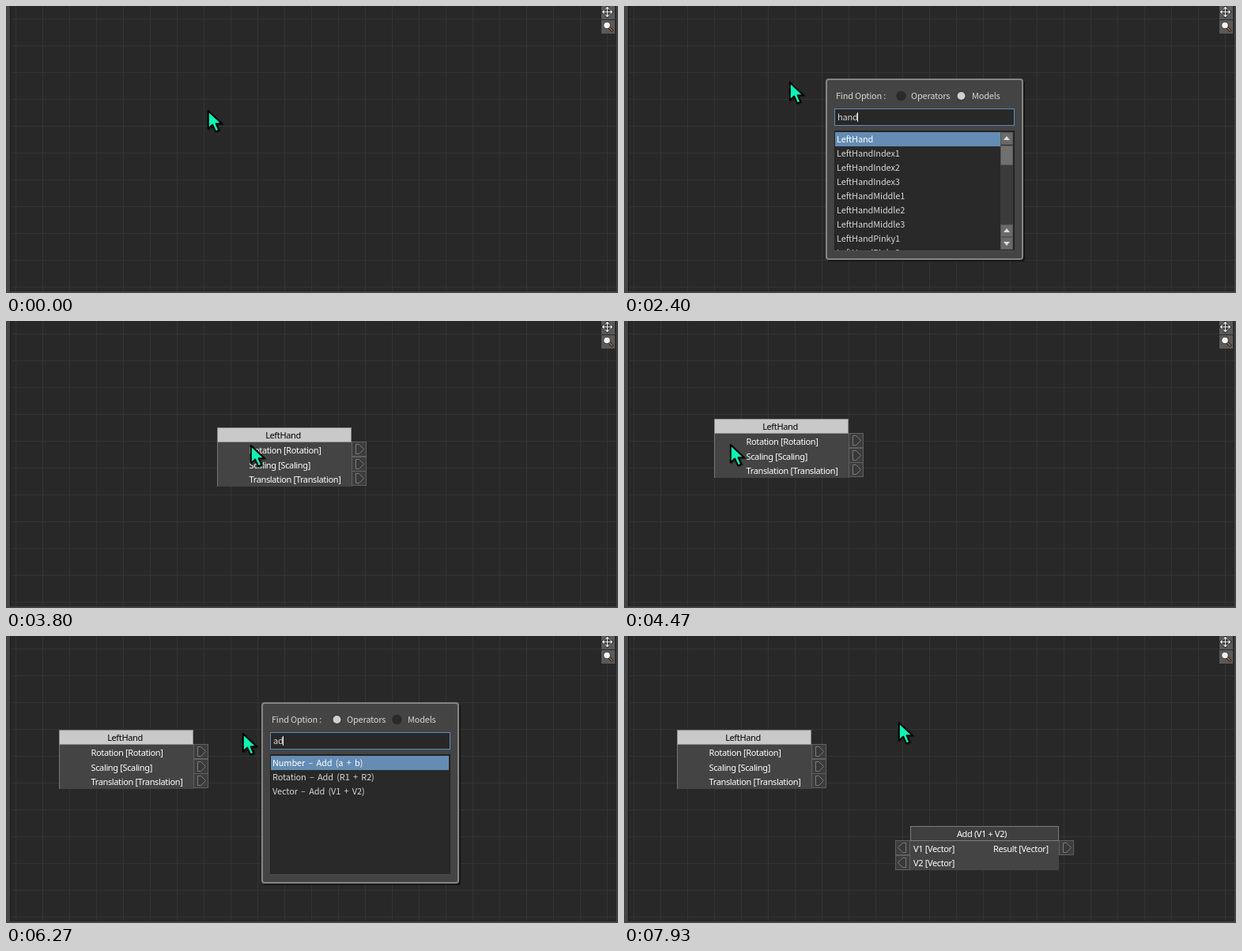
These frames come from a looping animation (774x364 px, 8 s). An HTML page:

```html
<!DOCTYPE html>
<html lang="en">
<head>
<meta charset="utf-8">
<title>Node editor</title>
<style>
  html, body { margin: 0; width: 100%; height: 100%; overflow: hidden; background: #282828; }
  svg { display: block; width: 774px; height: 364px; }
  rect, .grid { shape-rendering: crispEdges; }
  text { white-space: pre; }
  .ui { font: 11px "Noto Sans CJK JP", "Noto Sans CJK", "Liberation Sans", sans-serif; letter-spacing: -.22px; fill: #d6d6d6; }
  .list { letter-spacing: -.14px; word-spacing: 2px; }
  .node { font: 11px "Noto Sans", "Open Sans", sans-serif; letter-spacing: -.36px; fill: #fff; }
  .mid { text-anchor: middle; }
  .on { fill: #fff; }
  .dark { fill: #000; }
  .hint { fill: #858585; }
</style>
</head>
<body>
<svg id="stage" viewBox="0 0 774 364"></svg>
<script>
const LOOP = 8000, STEP = 1000 / 15;
let css = '', count = 0;

const pct = ms => (ms / LOOP * 100).toFixed(3) + '%';
const animated = (frames, body) => {
  const name = 'k' + count++;
  css += `@keyframes ${name}{${frames}}`;
  return `<g style="animation:${name} ${LOOP}ms step-end infinite">${body}</g>`;
};

// Visible only between two times
const show = (from, to, body) => animated(
  `0%{opacity:0}${pct(from)}{opacity:1}${pct(to)}{opacity:0}`, body);

// A run is a start time and legs of [steps, x, y]; each leg is even, at 15 steps a second
function move([x, y], runs, body) {
  const key = (ms, timing) =>
    `${pct(ms)}{transform:translate(${x}px,${y}px);animation-timing-function:${timing}}`;
  let frames = key(0, 'step-end');
  for (const [start, ...legs] of runs) {
    let ms = start;
    for (const [steps, toX, toY] of legs) {
      frames += key(ms, `steps(${steps},start)`);
      ms += steps * STEP;
      [x, y] = [toX, toY];
    }
    frames += key(ms, 'step-end');
  }
  return animated(frames + key(LOOP, 'step-end'), body);
}

const rect = (x, y, w, h, fill, more = '') =>
  `<rect x="${x}" y="${y}" width="${w}" height="${h}" fill="${fill}" ${more}/>`;
const frame = (x, y, w, h, fill, stroke) =>
  rect(x + .5, y + .5, w - 1, h - 1, fill, `stroke="${stroke}"`);
const circle = (x, y, r, fill) => `<circle cx="${x}" cy="${y}" r="${r}" fill="${fill}"/>`;
const text = (x, y, s, cls = 'ui') => `<text x="${x}" y="${y}" class="${cls}">${s}</text>`;
const path = (d, more) => `<path d="${d}" ${more}/>`;
const group = (x, y, body) => `<g transform="translate(${x} ${y})">${body}</g>`;

function backdrop() {
  let lines = '';
  for (let x = 12; x < 772; x += 34) lines += `M${x + .5} 0V361`;
  for (let y = 16; y < 361; y += 34) lines += `M7 ${y + .5}H772`;
  const arms = (color, width) => [0, 90, 180, 270].map(a => path('M0 0V-6M-2-4L0-6L2-4',
    `transform="rotate(${a})" stroke="${color}" stroke-width="${width}" fill="none"`)).join('');
  return path(lines, 'class="grid" stroke="#343434"')
    + rect(0, 0, 5, 364, '#444') + rect(5, 0, 1, 364, '#1c1c1c')
    + rect(772, 0, 2, 364, '#444') + rect(5, 362, 769, 2, '#444')
    + rect(753, 0, 17, 17, '#5a5a5a') + rect(753, 18, 17, 17, '#5a5a5a')
    + group(760.5, 7.5, arms('#222', 3) + arms('#eee', 1.2))
    + group(760, 24.5, path('M2 2L7.5 7.5', 'stroke="#222" stroke-width="3.4"')
      + path('M2 2L7 7', 'stroke="#a87a4c" stroke-width="1.4"')
      + circle(0, 0, 4.6, '#333') + circle(0, 0, 3.8, '#f4f4f4'));
}

const radio = (x, on) => circle(x, 22, 6.2, on ? '#363636' : '#2a2a2a')
  + (on ? circle(x, 22, 5, '#cfcfcf') : '');
const radios = models => radio(95.5, !models) + radio(171.5, models);
const caret = letters => rect(Math.round(14.8 + 6.3 * letters), 43, 1, 12, '#eee');
const placeholder = text(15, 53, 'Search', 'ui hint') + caret(0);

function scrollbar() {
  const button = (y, dir) => frame(221, y, 16, 16, '#6a6a6a', '#555')
    + group(229, y + 8, path('M-4-2H4L0 3Z', `fill="#ddd" transform="scale(1 ${dir})"`));
  return rect(221, 68, 16, 149, '#3b3b3b') + button(68, -1)
    + frame(221, 85, 16, 25, '#707070', '#585858') + button(185, -1) + button(201, 1);
}

function list(items) {
  const long = items.length > 8;
  const rows = items.slice(0, 9).map((s, i) => text(14, 81 + 18 * i, s, i ? 'ui list' : 'ui list on'));
  return rect(12, 68, long ? 209 : 225, 18, '#648cb4')
    + `<g clip-path="url(#rows)">${rows.join('')}</g>` + (long ? scrollbar() : '');
}

// Types a word letter by letter while the list narrows; the caret goes at blink
function typing(word, items, start, gap, blink, end) {
  let out = show(blink - gap, end, '');
  for (let n = 1; n <= word.length; n++) {
    const part = word.slice(0, n), from = start + (n - 1) * gap, last = n === word.length;
    const found = items.filter(s => s.toLowerCase().includes(part));
    out += show(from, last ? end : from + gap, text(15, 53, part) + list(found))
      + show(from, last ? blink : from + gap, caret(n));
  }
  return out;
}

const dialog = (x, y, body) => group(x, y,
  rect(3, 3, 249, 229, '#000', 'rx="3" opacity=".45"')
  + rect(1, 1, 248, 228, '#444', 'rx="3" stroke="#858585" stroke-width="2" style="shape-rendering:auto"')
  + text(13, 26, 'Find Option :') + text(108, 26, 'Operators') + text(185, 26, 'Models')
  + frame(11, 38, 228, 22, '#282828', '#5f8db9')
  + frame(11, 66, 228, 153, '#292929', '#202020') + rect(11, 218, 228, 1, '#4c4c4c') + body);

const fingers = ['Index', 'Middle', 'Pinky'].flatMap(f => [1, 2, 3].map(n => `LeftHand${f}${n}`));
const models = ['Head', 'Hips', 'LeftArm', 'LeftFoot', 'LeftForeArm', 'LeftHand', ...fingers];
const operators = ['Number – Absolute (|a|)', 'Number – Add (a + b)', 'Number – arccos (a)',
  'Number – arcsin (a)', 'Number – arctan (a)', 'Rotation – Add (R1 + R2)', 'Rotation – Damping',
  'Vector – Add (V1 + V2)', 'Vector – Damping'];

const modelSearch = dialog(255, 92,
  show(800, 1400, radios(false)) + show(1400, 3200, radios(true))
  + show(800, 1800, placeholder) + show(1400, 1800, list(models))
  + typing('hand', models, 1800, 190, 2670, 3200));

const operatorSearch = dialog(323, 84,
  radios(false) + show(5260, 5870, placeholder)
  + typing('add', operators, 5870, 230, 6470, 7470));

// Port cell; dir 1 points right
const port = (x, y, dir = 1) => frame(x, y, 19, 19, '#3d3d3d', '#606060')
  + group(x + 9.5, y + 9.5, path('M-4-6H0L6 0L0 6H-4Z',
    `transform="scale(${dir} 1)" fill="#383838" stroke="#7c7c7c"`));

const handNode = rect(0, 18, 171, 57, '#444') + rect(0, 18, 1, 57, '#777')
  + frame(0, 0, 170, 19, '#c9c9c9', '#8c8c8c') + text(83.5, 14, 'LeftHand', 'node mid dark')
  + ['Rotation', 'Scaling', 'Translation'].map((s, i) => {
    const y = Math.round(18.6 * i);
    return text(40.5, 33 + y, `${s} [${s}]`, 'node') + port(170, 18 + y);
  }).join('');

const addNode = rect(0, 18, 188, 38, '#444') + frame(0, 0, 188, 19, '#3f3f3f', '#7c7c7c')
  + text(90.5, 14, 'Add (V1 + V2)', 'node mid')
  + text(4, 33, 'V1 [Vector]', 'node') + text(4, 51, 'V2 [Vector]', 'node')
  + text(105, 33, 'Result [Vector]', 'node')
  + port(-19, 18, -1) + port(-19, 37, -1) + port(188, 18);

const arrow = 'M1 1.6V24L6.4 19.2L10.3 28L14.5 26.2L10.8 17.8H18.2Z';
const pointer = group(-.2, -.6,
  path(arrow, 'transform="translate(1.5 1)" stroke="#000" stroke-width="2" opacity=".35"')
  + path(arrow, 'fill="#0df5b5" stroke="#000" stroke-width="2" stroke-linejoin="round"'));

// The pointer holds the node 20 right and 32 down of its corner
const drag = [[5, 114, 124], [2, 67, 119]];
const held = drag.map(([steps, x, y]) => [steps, x + 20, y + 32]);

const cursor = move([255, 132], [
  [130, [4, 255, 130]],
  [800, [4, 184, 95], [1, 209, 96]],
  [3664, [3, 309, 157], [3, 287, 167]],
  [4198, ...held, [3, 312, 122]],
  [5126, [3, 323, 122]],
  [5600, [2, 299, 123]],
  [6664, [7, 386, 201]],
  [7660, [5, 347, 109]],
], pointer);

document.getElementById('stage').innerHTML =
  '<clipPath id="rows"><rect x="12" y="67" width="226" height="150.5"/></clipPath>'
  + backdrop()
  + show(3200, LOOP, move([267, 135], [[4198, ...drag]], handNode))
  + show(7470, LOOP, group(362, 241, addNode))
  + show(800, 3200, modelSearch)
  + show(5260, 7470, operatorSearch)
  + cursor;
document.head.appendChild(document.createElement('style')).textContent = css;
</script>
</body>
</html>
```
